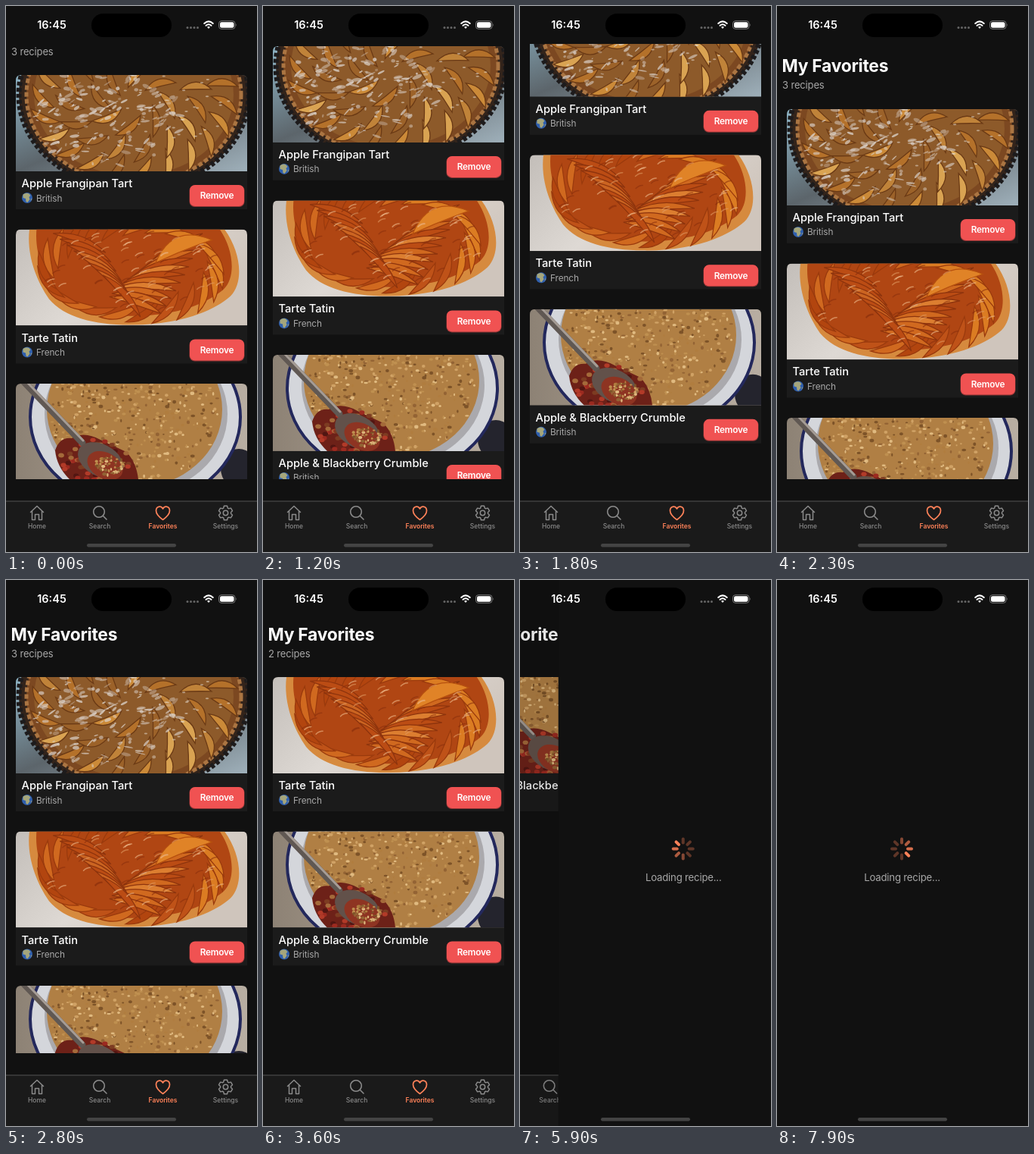
Animation, 332 px wide and 720 px high, one loop 8000 ms. Source, as an HTML page:

```html
<!DOCTYPE html>
<html lang="en">
<head>
<meta charset="utf-8">
<title>Favorites</title>
<style>
  html, body { margin: 0; width: 100%; height: 100%; overflow: hidden; background: #111; }
  svg { display: block; width: 100%; height: 100%; }
  text { font-family: Inter, Roboto, sans-serif; }
</style>
</head>
<body>
<svg id="stage" viewBox="0 0 332 720"></svg>
<script>
const LOOP = 8000, TICK = 100, W = 332;
const PITCH = 203.5, TOP = 128;
const ACCENT = '#ff8259', GRAY = '#8a8a8a';

function seeded(seed) {
  return () => (seed = (seed * 16807) % 2147483647) / 2147483647;
}
const repeat = (n, f) => Array.from({ length: n }, (_, i) => f(i)).join('');
const pick = (rnd, list) => list[Math.floor(rnd() * list.length)];

const rect = (x, y, w, h, fill, more = '') =>
  `<rect x="${x}" y="${y}" width="${w}" height="${h}" fill="${fill}" ${more}/>`;
const oval = (x, y, rx, ry, fill, more = '') =>
  `<ellipse cx="${x}" cy="${y}" rx="${rx}" ry="${ry}" fill="${fill}" ${more}/>`;
const path = (d, fill, more = '') => `<path d="${d}" fill="${fill}" ${more}/>`;
const line = (d, color, width, more = '') =>
  path(d, 'none', `stroke="${color}" stroke-width="${width}" stroke-linecap="round" stroke-linejoin="round" ${more}`);
const label = (s, x, y, size, fill, weight = 400, gap = 0, more = '') =>
  `<text x="${x}" y="${y}" font-size="${size}" fill="${fill}" font-weight="${weight}" letter-spacing="${gap}" ${more}>${s}</text>`;
const MIDDLE = 'text-anchor="middle"';

// Crescent-shaped fruit slice
const slice = (x, y, deg, len, bulge, fill, edge) =>
  path(`M${-len} 0Q0 ${-bulge * 2} ${len} 0Q0 ${-bulge * .1} ${-len} 0Z`, fill,
    `stroke="${edge}" stroke-width="1.3" transform="translate(${x.toFixed(1)} ${y.toFixed(1)}) rotate(${deg.toFixed(0)})"`);

// Random points spread evenly over an ellipse
const scatter = (rnd, n, cx, cy, rx, ry, f) => repeat(n, () => {
  const a = rnd() * 6.283, k = Math.sqrt(rnd());
  return f((cx + Math.cos(a) * rx * k).toFixed(1), (cy + Math.sin(a) * ry * k).toFixed(1));
});

function tartPhoto() {
  const r = seeded(71);
  let s = rect(0, 0, 306, 127, 'url(#steel)');
  s += oval(156, 26, 152, 125, '#33241b', 'stroke="#1d1b1c" stroke-width="7" stroke-dasharray="5 3"');
  s += oval(156, 26, 142, 117, '#7c4821', 'stroke="#ab7542" stroke-width="5" stroke-dasharray="6 3"');
  s += oval(156, 26, 132, 107, '#8d5a2a');
  for (const [k, n] of [[.88, 22], [.62, 15], [.32, 8]])
    s += repeat(n, i => {
      const a = i / n * 6.283 + k * 3;
      return slice(156 + Math.cos(a) * 136 * k, 34 + Math.sin(a) * 102 * k, a * 57.3 + 10 + r() * 40,
        21, 10, pick(r, ['#c08339', '#d9a352', '#b4712a', '#cb8a38', '#9c6229']), '#6b3a15');
    });
  s += scatter(r, 170, 118, 56, 105, 66, (x, y) =>
    oval(x, y, (1 + r() * 6).toFixed(1), (.6 + r() * 2).toFixed(1), '#ddd4cd',
      `opacity="${(.3 + r() * .5).toFixed(2)}" transform="rotate(${(r() * 80 - 50).toFixed(0)} ${x} ${y})"`));
  s += scatter(r, 45, 215, 30, 75, 55, (x, y) => oval(x, y, 2.2, 1, '#e6dccf', 'opacity=".55"'));
  return s;
}

function tatinPhoto() {
  const r = seeded(25);
  let s = rect(0, 0, 306, 127, 'url(#cloth)');
  const body = 'M18 0C14 32 26 66 44 92C64 116 104 126 150 126C214 127 262 108 284 88C302 70 298 30 276 0Z';
  s += path(body, '#d68a3e') + path(body, '#b04613', 'transform="translate(11 -3) scale(.93)"');
  s += repeat(22, i => {
    const a = i / 22 * 6.283;
    return slice(152 + Math.cos(a) * 110, 54 + Math.sin(a) * 54, a * 57.3 + 65, 27, 10,
      a > 5 || a < .8 ? '#db7c22' : pick(r, ['#bf5218', '#d0691f', '#b2450f']), '#9a3a0d');
  });
  s += repeat(11, i => slice(208 - i * 5, 30 + i * 7, -32 + i * 5, 46 - i, 9,
    pick(r, ['#d0691f', '#bb4c14', '#dc7e30']), '#8e340d'));
  s += repeat(8, i => slice(84 + i * 8, 18 + i * 10, 20 + i * 4, 37, 9, pick(r, ['#bb4c14', '#cb6421']), '#8e340d'));
  s += slice(222, 29, -22, 40, 20, '#e08327', '#b7510f');
  s += scatter(r, 75, 150, 56, 122, 56, (x, y) => line(`M${x} ${y}q4 -4 9 -4`,
    pick(r, ['#eebb8c', '#e09a62', '#8a2f0c']), 1.5, 'opacity=".6"'));
  return s;
}

function crumblePhoto() {
  const r = seeded(94);
  const crumbs = (n, cx, cy, rx, ry) => scatter(r, n, cx, cy, rx, ry, (x, y) =>
    oval(x, y, (1 + r() * 2).toFixed(1), (.9 + r() * 1.5).toFixed(1),
      pick(r, ['#d0a265', '#bf9050', '#e0ba80', '#7d5328', '#936334', '#b07d3f'])));
  let s = rect(0, 0, 306, 127, 'url(#linen)') + oval(295, 112, 24, 26, '#24242d');
  s += oval(158, 44, 139, 117, '#d4d6db', 'stroke="#23285c" stroke-width="4"');
  s += oval(159, 40, 121, 106, '#aaa9ad') + oval(157, 34, 116, 103, '#b07f44');
  s += crumbs(620, 157, 36, 112, 98);
  s += path('M52 88Q58 70 74 72Q90 62 112 74L146 90Q160 104 162 127H72Q54 110 52 88Z', '#6d2118');
  s += scatter(r, 55, 104, 102, 46, 28, (x, y) => oval(x, y, 3.6, 2.8,
    pick(r, ['#9c2a20', '#521612', '#b23a28', '#7d3c22', '#a46a3a'])));
  s += line('M10 -3L88 78', '#605853', 9) + line('M12 -5L89 75', '#a59c95', 3);
  s += oval(112, 101, 32, 21, '#62514a', 'transform="rotate(28 112 101)"');
  s += oval(118, 108, 25, 17, '#8e3422', 'transform="rotate(28 118 108)"');
  return s + crumbs(60, 124, 108, 20, 13);
}

const globe = oval(28, 162, 7, 7, '#2f5fae') +
  path('M22.500 157.500q4 -3 8 -1l2 2.500l-2 2l1 3l-3 4l-2 -1l-.5 -4l-3.500 -1z', '#a5a67c') +
  path('M33 163l1.200 .5l-1.500 3z', '#a5a67c');

const recipes = [
  ['Apple Frangipan Tart', 'British', tartPhoto],
  ['Tarte Tatin', 'French', tatinPhoto],
  ['Apple &amp; Blackberry Crumble', 'British', crumblePhoto]
];

// Cards are drawn from their own top edge
const card = ([name, area, photo], i) => `<g id="card${i}">
  ${rect(13, 120, 306, 57, '#1b1b1b')}
  <g transform="translate(13 0)" clip-path="url(#photo)">${photo()}</g>
  ${label(name, 20.5, 148, 14.7, '#fff', 500)}
  ${globe}${label(area, 40, 166.5, 11.8, '#a8a8a8', 400, -.1)}
  <g id="button${i}">${rect(242.5, 145.5, 73, 28.5, '#8f3434', 'rx="7"')}${rect(243, 145, 72, 28, '#f05252', 'rx="7"')}
  ${label('Remove', 279, 163.2, 11.8, '#fff', 600, -.2, MIDDLE)}</g></g>`;

function gear(x, y) {
  const at = (a, r) => `${(x + Math.sin(a) * r).toFixed(2)} ${(y - Math.cos(a) * r).toFixed(2)}`;
  const d = repeat(6, i => [[-.42, 7], [-.22, 9.4], [.22, 9.4], [.42, 7]]
    .map(([a, r], j) => (i + j ? 'L' : 'M') + at(a + i * Math.PI / 3, r)).join(''));
  return line(d + 'Z', GRAY, 1.5) + oval(x, y, 3.2, 3.2, 'none', `stroke="${GRAY}" stroke-width="1.5"`);
}

const tab = (name, x, icon, color = GRAY, weight = 500) => icon + label(name, x, 689, 8.5, color, weight, 0, MIDDLE);

const tabBar = rect(0, 653, W, 67, '#1a1a1a') + rect(0, 652.5, W, 1, '#555') +
  tab('Home', 41, line('M32.5 667.5L41 659.5L49.5 667.5M34.5 666V677.5H38.5V670.5H43.5V677.5H47.5V666', GRAY, 1.5)) +
  tab('Search', 124, oval(123, 667, 7.3, 7.3, 'none', `stroke="${GRAY}" stroke-width="1.6"`) + line('M128.5 672.5L133 677', GRAY, 1.6)) +
  tab('Favorites', 207.5, line('M207.5 677.5C202 673.5 198.5 670 198.5 665.5C198.5 659.5 205 658.5 207.5 663C210 658.5 216.5 659.5 216.5 665.5C216.5 670 213 673.5 207.5 677.5Z', ACCENT, 1.7), ACCENT, 600) +
  tab('Settings', 290.5, gear(290.5, 668.5));

const spokes = repeat(8, i => line('M0 -8V-13', ACCENT, 4, `class="spoke" transform="rotate(${i * 45})"`));

const statusBar = label('16:45', 60.5, 30, 14.5, '#fff', 600, 0, MIDDLE) +
  rect(113, 10, 106, 31, '#000', 'rx="15.5"') +
  repeat(4, i => oval(240 + i * 4.5, 28.5, 1.5, 1.5, '#666')) +
  line('M262.3 23Q268 17.8 273.7 23', '#fff', 2.1) + line('M264.5 25.8Q268 22.8 271.5 25.8', '#fff', 2) +
  path('M266 27.7Q268 26.2 270 27.7L268 30Z', '#fff') +
  rect(281.5, 19.7, 21.5, 10.6, 'none', 'rx="3.4" stroke="#777" stroke-width="1"') +
  rect(283, 21.2, 18.5, 7.6, '#fff', 'rx="2.2"') + path('M304.3 23.3q1.6 1.7 0 3.4z', '#777');

const ramp = (id, dir, ...stops) => `<linearGradient id="${id}" ${dir}>` +
  stops.map((c, i) => `<stop offset="${i / (stops.length - 1)}" stop-color="${c}"/>`).join('') + '</linearGradient>';

document.getElementById('stage').innerHTML = `<defs>
  ${ramp('steel', 'x2="1" y2="1"', '#8fb5c6', '#5c656b', '#9fb0ba')}
  ${ramp('cloth', 'x2="1" y2=".4"', '#c3beb9', '#ded9d4', '#cfc5bc')}
  ${ramp('linen', 'x2="1"', '#8d8275', '#a89b8c', '#b8aea2')}
  <clipPath id="photo"><path d="M0 127V7Q0 0 7 0H299Q306 0 306 7V127Z"/></clipPath>
  <clipPath id="view"><rect y="50" width="${W}" height="574"/></clipPath>
  </defs>
  ${rect(0, 0, W, 720, '#111')}
  <g id="list">
    <g clip-path="url(#view)"><g id="scroll">
      ${label('My Favorites', 6.5, 79.5, 22.8, '#fff', 700, -.25)}
      ${label('', 7, 101.5, 13, '#a8a8a8', 400, -.15, 'id="count"')}
      ${recipes.map(card).join('')}
    </g></g>
    ${tabBar}
    ${rect(0, 0, W, 720, '#000', 'id="shade"')}
  </g>
  <g id="detail">
    ${rect(0, 0, W, 720, '#111')}
    <g transform="translate(165 354.5)">${spokes}</g>
    ${label('Loading recipe...', 165.5, 397, 13.2, '#a8a8a8', 400, -.2, MIDDLE)}
  </g>
  ${statusBar}${rect(107, 709, 118, 4.5, '#444', 'rx="2.2"')}`;

const $ = id => document.getElementById(id);
const cards = recipes.map((_, i) => $('card' + i));
const buttons = recipes.map((_, i) => $('button' + i));
const rays = document.querySelectorAll('.spoke');
const move = (el, x, y) => el.setAttribute('transform', `translate(${x.toFixed(2)} ${y.toFixed(2)})`);
const fade = (el, v) => el.setAttribute('opacity', v.toFixed(3));
const clamp = v => Math.max(0, Math.min(1, v));

function scrollAt(t) {
  if (t < 1200) return 37;
  if (t <= 2000) return 37 + 102 * (1 - Math.exp((1100 - t) / 214));
  if (t >= 3000) return 0;
  // Swing back past the top, then settle
  const s = (t - 2050) / 1000;
  const y = 138 * Math.exp(-5.2 * s) * Math.cos(7.14 * s);
  return s > .3 ? Math.min(0, y) : y;
}

function pushAt(t) {
  if (t >= 6300) return 1;
  const x = Math.max(0, (t - 5719) / 1000 * 18.5);
  return 1 - (1 + x) * Math.exp(-x);
}

// 1 while held, with short fades at both ends
const press = (t, down, up) => clamp((t - down + 80) / 160) * clamp((up + 250 - t) / 250);

function draw(t) {
  const gone = t < 3300 ? 0 : t < 4200 ? 1 : 2;
  const left = 3 - gone;
  move($('scroll'), 0, -scrollAt(t));
  $('count').textContent = left + (left === 1 ? ' recipe' : ' recipes');
  cards.forEach((el, i) => {
    el.setAttribute('display', i < gone ? 'none' : 'inline');
    move(el, 0, TOP + (i - gone) * PITCH);
  });
  fade(buttons[0], 1 - .4 * press(t, 3000, 3200));
  fade(buttons[1], 1 - .4 * press(t, 4000, 4100));
  fade(cards[2], 1 - .2 * press(t, 4900, 5500));

  const p = pushAt(t);
  move($('list'), -.3 * W * p, 0);
  move($('detail'), W * (1 - p), 0);
  fade($('shade'), .12 * p);

  const head = (t / TICK + 4) % 8;
  rays.forEach((el, i) => fade(el, Math.max(.33, 1 - .17 * ((head - i + 8) % 8))));
}

const start = performance.now();
function tick() {
  const t = (performance.now() - start) % LOOP;
  draw(Math.floor(t / TICK) * TICK);
  requestAnimationFrame(tick);
}
tick();
</script>
</body>
</html>
```
